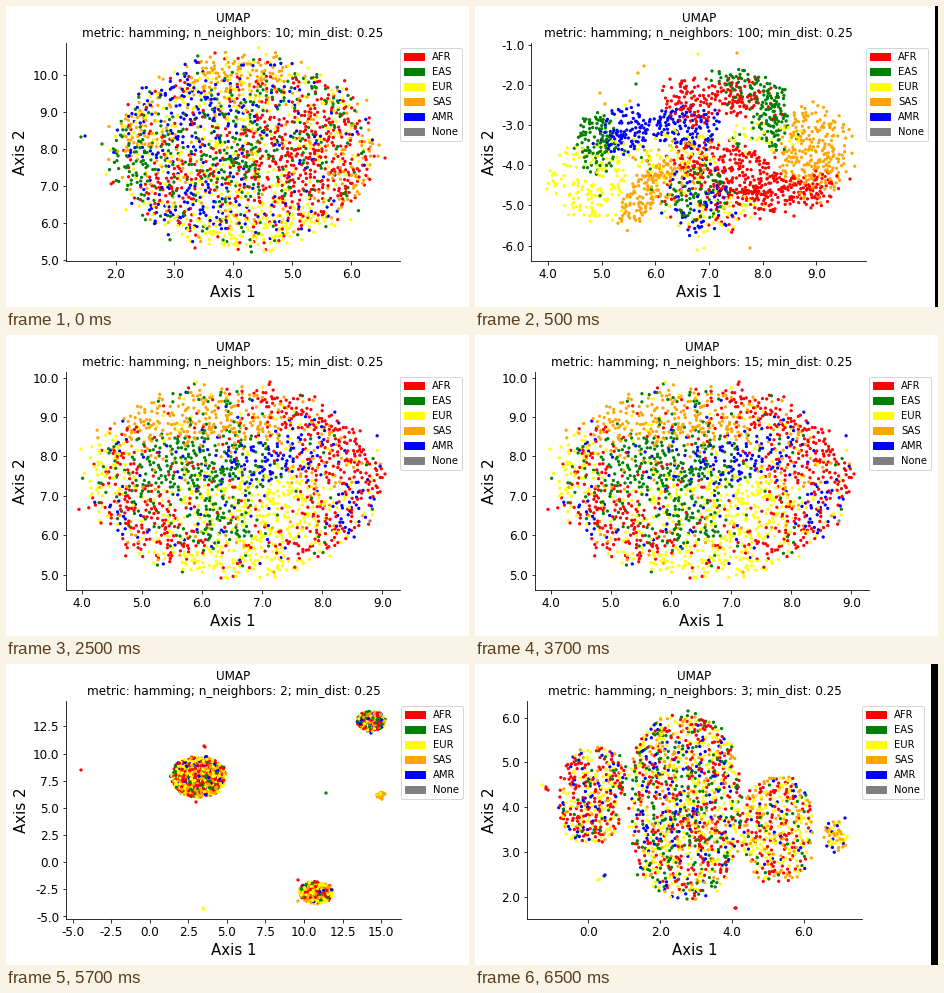
A matplotlib script for the animation above (8 s loop, 463 px wide and 301 px high).

```python
import matplotlib.pyplot as plt
import numpy as np
from matplotlib.animation import FuncAnimation
from matplotlib.patches import Patch, Rectangle

W, H, DPI = 463, 301, 72
AX_W, AX_H, AX_BOTTOM = 334.8, 217.44, 254.7
COLORS = dict(r="red", g="green", y="yellow", o="orange", b="blue", n="gray")
GROUPS = dict(zip(["AFR", "EAS", "EUR", "SAS", "AMR", "None"], COLORS.values()))

plt.rcParams["font.family"] = "DejaVu Sans"
rng = np.random.default_rng(12)


def ellipse(n, cx, cy, rx, ry, tilt=0, power=2, fuzz=0.03):
    """Random points filling a (super)ellipse with a slightly frayed edge."""
    t = rng.uniform(0, 2 * np.pi, n)
    r = rng.random(n) ** 0.53 * (1 + fuzz * rng.normal(size=n))
    c, s = np.cos(t), np.sin(t)
    x = rx * r * np.sign(c) * abs(c) ** (2 / power)
    y = ry * r * np.sign(s) * abs(s) ** (2 / power)
    a = np.radians(tilt)
    return np.column_stack([cx + x * np.cos(a) - y * np.sin(a),
                            cy + x * np.sin(a) + y * np.cos(a)])


def thin(points, gap):
    """Drop points that lie closer than gap to one already kept."""
    kept = np.empty_like(points)
    count = 0
    for p in points:
        if not count or ((kept[:count] - p) ** 2).sum(1).min() > gap * gap:
            kept[count] = p
            count += 1
    return kept[:count]


def tint(points, base, fields):
    """Pick a group per point from base weights plus Gaussian patches."""
    keys = "rgyob"
    weights = np.tile(np.array(base, float), (len(points), 1))
    for key, cx, cy, sx, sy, amp in fields:
        d = ((points[:, 0] - cx) / sx) ** 2 + ((points[:, 1] - cy) / sy) ** 2
        weights[:, keys.index(key)] += amp * np.exp(-d)
    total = weights.cumsum(1)
    pick = (rng.random(len(points))[:, None] * total[:, -1:] > total).sum(1)
    return [keys[i] for i in pick]


def mixed(blobs, gap, singles, **shape):
    """Blobs of (palette, count, cx, cy, rx, ry, tilt) and single dots."""
    points, keys = [], []
    for palette, n, *geometry in blobs:
        blob = thin(ellipse(n, *geometry, **shape), gap)
        points.append(blob)
        keys += list(rng.choice(list(palette), len(blob)))
    points = np.vstack(points + [[s[1:] for s in singles]])
    keys += [s[0] for s in singles]
    order = rng.permutation(len(points))
    return points[order], [keys[i] for i in order]


def cloud(n, geometry, gap, base, fields, singles):
    points = thin(ellipse(n, *geometry, fuzz=0.05), gap)
    keys = tint(points, base, fields) + [s[0] for s in singles]
    return np.vstack([points, [s[1:] for s in singles]]), keys


ten = cloud(
    2600, (237, 146, 130, 94), 1.7, (.35, .25, .35, .15, .22),
    [("o", 228, 68, 38, 18, 3), ("o", 140, 118, 28, 25, 1.6),
     ("o", 350, 170, 22, 50, 1.6), ("r", 305, 155, 50, 45, 2.4),
     ("r", 165, 180, 35, 25, .9), ("g", 125, 155, 30, 30, 1.4),
     ("g", 235, 145, 40, 35, .9), ("g", 315, 90, 35, 22, .9),
     ("y", 250, 222, 80, 22, 1.4), ("y", 185, 75, 40, 20, .9),
     ("y", 320, 80, 40, 25, .6), ("b", 185, 100, 45, 35, 1.1),
     ("b", 195, 210, 35, 22, .9)],
    [("g", 75, 131), ("b", 79, 130), ("r", 209, 47), ("r", 379, 152),
     ("r", 189, 242), ("y", 264, 245), ("g", 96, 138)])

hundred = mixed(
    [("y", 155, 115, 172, 40, 42, 0), ("g", 120, 121, 138, 21, 32, 0),
     ("b", 130, 150, 124, 28, 24, -20), ("yyo", 110, 205, 150, 42, 26, 0),
     ("b", 135, 213, 120, 36, 22, 0), ("r", 150, 228, 95, 42, 26, 0),
     ("rrrg", 65, 275, 94, 34, 20, 20), ("g", 90, 278, 84, 38, 16, 22),
     ("g", 90, 297, 115, 18, 23, 0), ("yyg", 65, 290, 132, 38, 15, 0),
     ("r", 260, 258, 163, 60, 25, 18), ("r", 160, 305, 188, 52, 18, 0),
     ("gggb", 115, 222, 185, 32, 32, 0), ("bbry", 100, 226, 203, 38, 26, 0),
     ("o", 290, 339, 146, 34, 47, 0), ("o", 130, 170, 188, 37, 16, -52),
     ("yoor", 75, 200, 172, 30, 28, 0), ("yr", 50, 262, 203, 38, 23, 0),
     ("r", 28, 345, 180, 28, 14, -10), ("yg", 25, 150, 165, 45, 38, 0)],
    1.5,
    [("o", 125, 87), ("o", 155, 95), ("o", 169, 60), ("y", 223, 48),
     ("o", 262, 47), ("y", 222, 244), ("y", 229, 242), ("o", 275, 242),
     ("g", 161, 78), ("o", 163, 67), ("y", 72, 183), ("r", 375, 173),
     ("o", 130, 98), ("y", 150, 99), ("g", 237, 65), ("r", 319, 210)],
    fuzz=.11)

fifteen = cloud(
    2450, (227, 146, 145, 93), 1.8, (.22, .1, .16, .1, .09),
    [("o", 180, 80, 65, 24, 2.4), ("o", 265, 92, 45, 18, 1),
     ("o", 320, 130, 25, 35, .4), ("r", 280, 65, 45, 25, 2.2),
     ("r", 345, 120, 35, 45, 1.9), ("r", 320, 195, 38, 25, 1.6),
     ("r", 120, 180, 45, 35, 1.4), ("r", 165, 210, 35, 20, .8),
     ("g", 195, 125, 50, 24, 2), ("g", 145, 148, 32, 28, 1.2),
     ("g", 210, 185, 32, 24, 1.6), ("g", 205, 70, 30, 18, .6),
     ("b", 238, 132, 30, 18, 1.8), ("b", 290, 115, 30, 20, 1.5),
     ("b", 350, 178, 20, 24, 2), ("b", 115, 185, 30, 25, .4),
     ("y", 85, 130, 22, 35, 1.8), ("y", 275, 170, 42, 30, 2.6),
     ("y", 215, 232, 75, 18, 2.2), ("y", 180, 165, 28, 22, .9)],
    [("n", 364, 186), ("y", 190, 47), ("r", 264, 47), ("r", 215, 243),
     ("r", 379, 139), ("y", 75, 114), ("y", 269, 242), ("o", 219, 58)])

two = mixed(
    [("rrrgyyyooob", 1100, 193, 113, 27, 20.5, 0),
     ("rrggyyooob", 300, 365, 57, 14, 10, 0),
     ("rrrgyyyooob", 400, 310, 228.5, 17, 11, 0),
     ("ooy", 22, 375, 131.5, 4.5, 3.8, 0)],
    .5,
    [("r", 75, 106), ("r", 198, 82), ("r", 199, 83), ("r", 190, 138),
     ("g", 320, 129), ("y", 197, 244), ("y", 198, 245), ("b", 365, 69),
     ("r", 292, 216), ("o", 292, 237)])

three = mixed(
    [("rrrrryyybbgo", 460, 118, 131, 33, 49, 8),
     ("rrrrgggyyyyoobb", 1480, 210, 142, 56, 92, 0),
     ("rrryyyyooogb", 520, 302, 165, 36, 53, 0),
     ("oooyyyb", 75, 360, 173, 12, 16, 0)],
    1.7,
    [("y", 67, 121), ("r", 71, 123), ("r", 73, 126), ("r", 71, 125),
     ("y", 123, 216), ("g", 129, 212), ("b", 130, 211), ("y", 124, 215),
     ("r", 260, 244), ("r", 261, 244), ("g", 213, 47), ("b", 370, 154),
     ("g", 212, 235)],
    power=2.4)


# Ticks are (first value, value step, count, first pixel, pixel step).
SCENES = [
    dict(k=10, left=59.6, dots=ten, bar=None,
         xt=(2, 1, 5, 109.5, 59), yt=(5, 1, 6, 253.6, -37)),
    dict(k=100, left=56.3, dots=hundred, bar=460,
         xt=(4, 1, 6, 73, 53.7), yt=(-6, 1, 6, 239.6, -40.1)),
    dict(k=15, left=59.6, dots=fifteen, bar=None,
         xt=(4, 1, 6, 75.5, 60.2), yt=(5, 1, 6, 239.7, -39.4)),
    dict(k=2, left=60, dots=two, bar=None,
         xt=(-5, 2.5, 9, 66.5, 38.6), yt=(-5, 2.5, 8, 252.5, -27.15)),
    dict(k=3, left=52.2, dots=three, bar=456,
         xt=(0, 2, 4, 113.5, 71.7), yt=(2, 1, 5, 232.6, -44.7)),
]
TIMELINE = np.repeat(range(5), [1, 4, 4, 4, 3])

fig = plt.figure(figsize=(W / DPI, H / DPI), dpi=DPI, facecolor="white")


def ticks(first, step, count, pixel, pitch):
    i = np.arange(count)
    return pixel + pitch * i, [f"{first + step * n:.1f}" for n in i]


def draw(frame):
    scene = SCENES[TIMELINE[frame]]
    left = scene["left"]
    fig.clear()
    ax = fig.add_axes([left / W, 1 - AX_BOTTOM / H, AX_W / W, AX_H / H])
    points, keys = scene["dots"]
    ax.scatter(*points.T, s=5, c=[COLORS[key] for key in keys])
    ax.set_xlim(left, left + AX_W)
    ax.set_ylim(AX_BOTTOM, AX_BOTTOM - AX_H)
    ax.set_xticks(*ticks(*scene["xt"]), fontsize=12)
    ax.set_yticks(*ticks(*scene["yt"]), fontsize=12)
    ax.spines[["top", "right"]].set_visible(False)
    ax.set_xlabel("Axis 1", fontsize=15)
    ax.set_ylabel("Axis 2", fontsize=15)
    ax.set_title(f"UMAP\nmetric: hamming; n_neighbors: {scene['k']}; min_dist: 0.25",
                 fontsize=12)
    ax.legend(handles=[Patch(color=c, label=name) for name, c in GROUPS.items()],
              loc="upper right", bbox_to_anchor=(1.2, 1), fontsize=10)
    if scene["bar"]:
        fig.add_artist(Rectangle((scene["bar"] / W, 0), 1, 1, color="black", lw=0,
                                 transform=fig.transFigure))
    return []


anim = FuncAnimation(fig, draw, frames=len(TIMELINE), interval=500,
                     init_func=lambda: [], repeat=True, repeat_delay=0)
plt.show()
```
